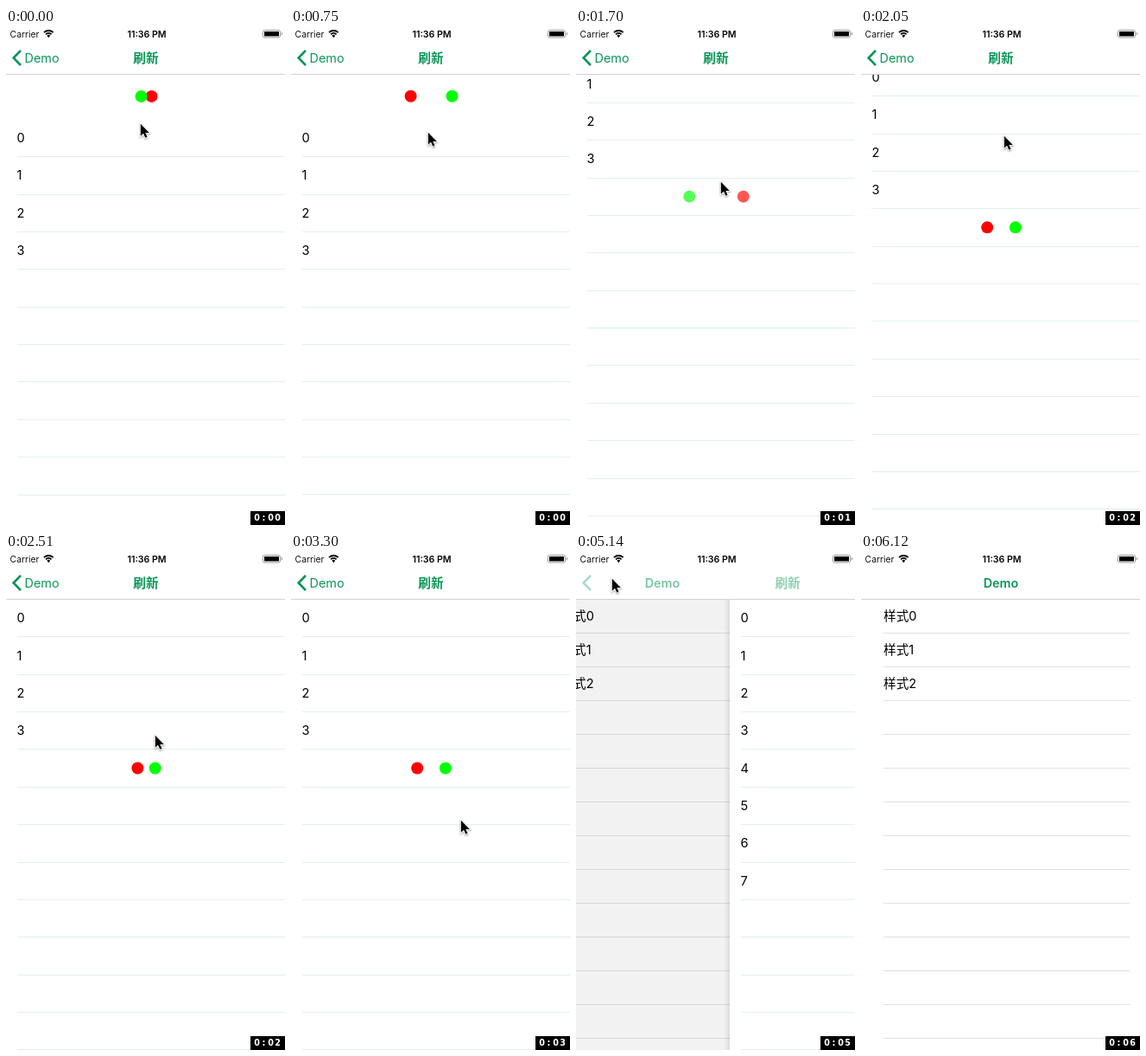
Recreate the animation shown at these times as an HTML page with a canvas. Size 323 px wide and 574 px high, loop 6.18 s.

```html
<!DOCTYPE html>
<html lang="en">
<head>
<meta charset="utf-8">
<title>Pull to refresh</title>
<style>
  html, body { margin: 0; width: 100%; height: 100%; overflow: hidden; background: #fff; }
  canvas { display: block; }
</style>
</head>
<body>
<canvas id="stage" width="323" height="574"></canvas>
<script>
const ctx = document.getElementById('stage').getContext('2d');
const W = 323, H = 574, LOOP = 6180, NAV = 53, MID = 162;
const GREEN = '#0b9558';
const FACE = 'Inter, "Noto Sans CJK SC", "Noto Sans CJK", sans-serif';

// Cursor tip: time, x, y
const PATH = [
  [0, 155, 110], [300, 155, 113], [700, 158, 116], [1300, 172, 299], [1390, 172, 299],
  [1880, 165, 124], [2080, 165, 124], [2680, 174, 231], [3240, 196, 308], [3900, 196, 308],
  [4200, 192, 298], [4530, 112, 70], [4800, 41, 29], [5280, 41, 29],
  [5830, 246, 558], [5950, 262, 582]
];

const clamp = v => Math.max(0, Math.min(1, v));
const lerp = (a, b, p) => a + (b - a) * p;
const smooth = p => p * p * (3 - 2 * p);
const phase = (t, from, to) => smooth(clamp((t - from) / (to - from)));
// Remaining distance of a critically damped spring
const spring = (ms, rate) => {
  const x = Math.max(0, ms) / 1000 * rate;
  return (1 + x) * Math.exp(-x);
};

function cursorAt(t) {
  const i = PATH.findIndex(k => k[0] > t);
  if (i < 0) return PATH[PATH.length - 1].slice(1);
  const [t0, x0, y0] = PATH[i - 1], [t1, x1, y1] = PATH[i];
  const p = smooth((t - t0) / (t1 - t0));
  return [lerp(x0, x1, p), lerp(y0, y1, p)];
}

function scrollAt(t) {
  if (t < 1400) return 51.9 * (1 - phase(t, 740, 1140));
  if (t < 1890) return -83 * phase(t, 1430, 1880);
  const y = -83 * spring(t - 1890, 18);
  return y > -0.3 ? 0 : y;
}

function text(s, x, y, size, color, weight = 400, align = 'left') {
  ctx.font = `${weight} ${size}px ${FACE}`;
  ctx.textAlign = align;
  ctx.fillStyle = color;
  ctx.fillText(s, x, y);
}

function rect(x, y, w, h, color) {
  ctx.fillStyle = color;
  ctx.fillRect(x, y, w, h);
}

function faded(alpha, draw) {
  ctx.globalAlpha = clamp(alpha);
  draw();
  ctx.globalAlpha = 1;
}

// Two balls trading places; the left-moving side decides which is in front
function balls(y, angle) {
  const x = 33 * Math.sin(angle);
  const pair = [['#f00', x], ['#0f0', -x]];
  if (Math.cos(angle) < 0) pair.reverse();
  for (const [color, dx] of pair) {
    ctx.fillStyle = color;
    ctx.beginPath();
    ctx.arc(162.5 + dx, y, 7, 0, 7);
    ctx.fill();
  }
}

function numberList(t) {
  const top = NAV + scrollAt(t), pitch = 43.36;
  const count = t < 3950 ? 4 : 8;
  rect(0, NAV, W, H - NAV, '#fff');
  for (let i = 0; i < 14; i++) {
    const y = top + i * pitch;
    if (i < count) text(i, 12.4, Math.round(y + 27.2), 14.64, '#000');
    rect(13, Math.round(y + pitch), W - 13, 1, '#e0f0ee');
  }
  if (t < 1300) balls(top - 26, t / 1250 * 2 * Math.PI + 0.183);
  if (t > 1600 && t < 3950) {
    faded((t - 1600) / 150, () =>
      balls(top + 4 * pitch + 22, (t - 1947) / 1250 * 2 * Math.PI + Math.PI));
  }
}

function styleList(p) {
  const x = -97 * (1 - p);
  rect(0, NAV, W, H - NAV, '#fff');
  for (let i = 0; i < 14; i++) {
    const y = NAV + 39 * i;
    if (i < 3) text('样式' + i, x + 26, y + 25, 14.64, '#000');
    rect(x + 26, y + 39, 285, 1, '#e1e1e3');
  }
  rect(0, NAV, W, H - NAV, `rgba(0,0,0,${0.115 * (1 - p)})`);
}

function pages(t, p) {
  ctx.save();
  ctx.beginPath();
  ctx.rect(0, NAV, W, H - NAV);
  ctx.clip();
  if (p > 0) styleList(p);
  if (p < 1) {
    const x = Math.round(p * W);
    ctx.translate(x, 0);
    if (x > 0) {
      const g = ctx.createLinearGradient(-7, 0, 0, 0);
      g.addColorStop(0, 'rgba(0,0,0,0)');
      g.addColorStop(1, `rgba(0,0,0,${0.2 * (1 - p)})`);
      rect(-7, NAV, 7, H - NAV, g);
    }
    numberList(t);
  }
  ctx.restore();
}

function navBar(p) {
  rect(0, 0, W, NAV, '#fff');
  rect(0, NAV, W, 1, '#d2d2d4');
  faded(1 - 1.2 * p, () => {
    ctx.strokeStyle = GREEN;
    ctx.lineWidth = 2.6;
    ctx.beginPath();
    ctx.moveTo(17, 26);
    ctx.lineTo(8.7, 34.5);
    ctx.lineTo(17, 43);
    ctx.stroke();
  });
  faded(1 - 2.5 * p, () => text('Demo', 21.5 + 120 * p, 40, 14.4, GREEN));
  faded(1 - p, () => text('刷新', MID + 151 * p, 40, 14.64, GREEN, 700, 'center'));
  faded(p, () => text('Demo', lerp(24, MID, p), 40, 14.4, GREEN, 600, 'center'));
}

function statusBar() {
  text('Carrier', 4.6, 10.6, 10.33, '#111');
  text('11:36 PM', 163, 10.6, 10.6, '#000', 600, 'center');

  ctx.strokeStyle = '#000';
  ctx.lineWidth = 1.8;
  for (const r of [4.7, 7.7]) {
    ctx.beginPath();
    ctx.arc(49.3, 10.7, r, -2.33, -0.81);
    ctx.stroke();
  }
  ctx.fillStyle = '#000';
  ctx.beginPath();
  ctx.moveTo(49.3, 11.2);
  ctx.arc(49.3, 10.7, 2.8, -2.33, -0.81);
  ctx.fill();

  ctx.strokeStyle = '#999';
  ctx.lineWidth = 1;
  ctx.beginPath();
  ctx.roundRect(297.5, 2.5, 20, 8.5, 2);
  ctx.stroke();
  rect(299, 4, 17, 5.5, '#000');
  rect(318.8, 5.2, 1.2, 3, '#999');
}

function cursor(t) {
  if (t >= 5950) return;
  const [x, y] = cursorAt(t);
  ctx.save();
  ctx.translate(Math.round(x) + 0.8, Math.round(y) + 0.8);
  ctx.beginPath();
  ctx.moveTo(0, 0);
  for (const [a, b] of [[0, 14], [3.2, 11], [5.5, 16], [7.7, 15], [5.5, 10.1], [10, 10.1]]) {
    ctx.lineTo(a, b);
  }
  ctx.closePath();
  ctx.shadowColor = 'rgba(0,0,0,.4)';
  ctx.shadowBlur = 2;
  ctx.shadowOffsetY = 1;
  ctx.strokeStyle = '#fff';
  ctx.lineWidth = 1.8;
  ctx.stroke();
  ctx.shadowColor = 'transparent';
  ctx.fillStyle = '#000';
  ctx.fill();
  ctx.restore();
}

function timer(t) {
  rect(283, 558, 40, 16, '#000');
  ctx.font = 'bold 9.6px "DejaVu Sans", sans-serif';
  ctx.textAlign = 'center';
  ctx.fillStyle = '#fff';
  [...'0:0' + Math.floor(t / 1020)].forEach((c, i) => ctx.fillText(c, 290.5 + 8 * i, 569));
}

function draw(now) {
  const t = now % LOOP;
  let p = t < 4990 ? 0 : 1 - spring(t - 4990, 12.3);
  if (p > 0.997) p = 1;
  pages(t, p);
  navBar(p);
  statusBar();
  cursor(t);
  timer(t);
}

let start;
function tick(now) {
  start ??= now;
  draw(Math.max(0, now - start));
  requestAnimationFrame(tick);
}
draw(0);
requestAnimationFrame(tick);
</script>
</body>
</html>
```
